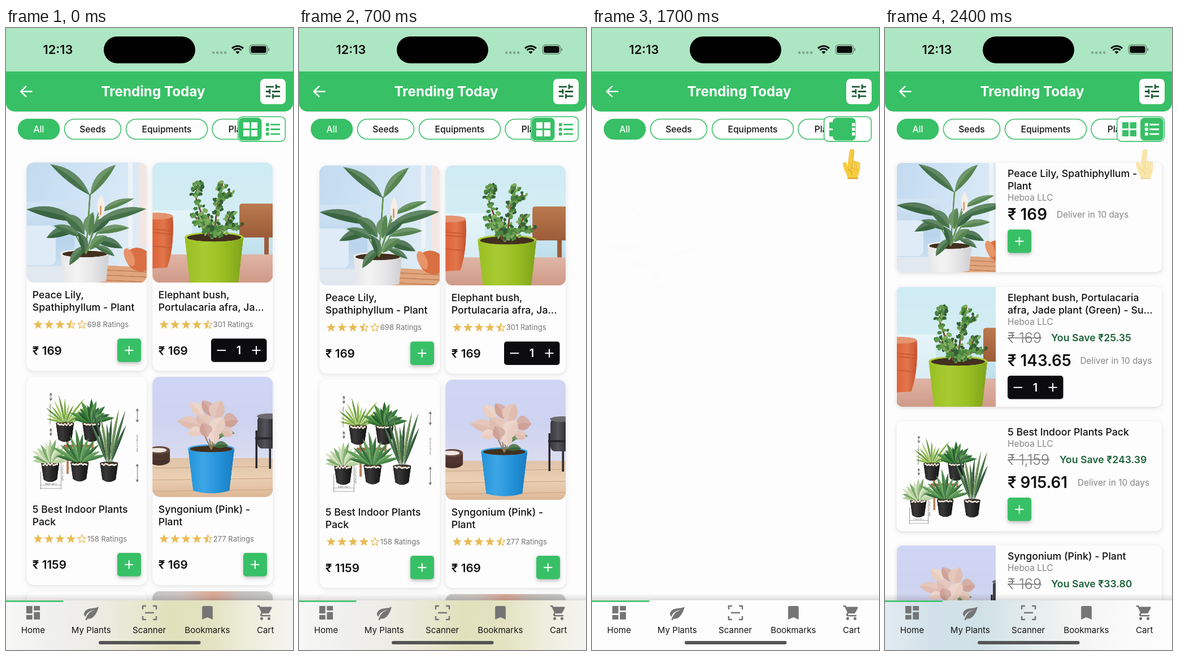
An HTML page with a canvas for the animation above (2500 ms loop, 508 by 1102 pixels).

```html
<!DOCTYPE html>
<html lang="en">
<head>
<meta charset="utf-8">
<title>Trending Today</title>
<style>
  html, body { margin: 0; width: 100%; height: 100%; overflow: hidden; background: #fefdfe; }
  canvas { display: block; width: 508px; height: 1102px; }
</style>
</head>
<body>
<canvas id="stage" aria-label="Plant shop: trending products"></canvas>
<script>
const W = 508, H = 1102, LOOP = 2500, STEP = 100, TAP = 1650;
const GREEN = '#38c066', PAPER = '#fefdfe', GREY = '#757575', GOLD = '#e8bb55';
const TAU = Math.PI * 2;
const stage = document.getElementById('stage');
const dpr = window.devicePixelRatio || 1;
stage.width = W * dpr;
stage.height = H * dpr;
let c = stage.getContext('2d');
c.scale(dpr, dpr);

// ---- helpers ----
const ease = x => x * x * (3 - 2 * x);
const clamp = x => Math.min(1, Math.max(0, x));

function track(t, keys) {
  if (t <= keys[0][0]) return keys[0][1];
  for (let i = 1; i < keys.length; i++) {
    const [t0, a] = keys[i - 1], [t1, b] = keys[i];
    if (t <= t1) return a + (b - a) * ease((t - t0) / (t1 - t0));
  }
  return keys[keys.length - 1][1];
}

function seeded(s) {
  return () => (s = (s * 16807) % 2147483647) / 2147483647;
}

function rect(x, y, w, h, fill) {
  c.fillStyle = fill;
  c.fillRect(x, y, w, h);
}

function box(x, y, w, h, r, fill, stroke, lw = 1.6) {
  c.beginPath();
  c.roundRect(x, y, w, h, r);
  if (fill) { c.fillStyle = fill; c.fill(); }
  if (stroke) { c.strokeStyle = stroke; c.lineWidth = lw; c.stroke(); }
}

function line(pts, color, lw, cap = 'butt') {
  c.beginPath();
  pts.forEach(([x, y], i) => i ? c.lineTo(x, y) : c.moveTo(x, y));
  c.strokeStyle = color;
  c.lineWidth = lw;
  c.lineCap = cap;
  c.lineJoin = 'round';
  c.stroke();
}

function poly(pts, fill) {
  c.beginPath();
  pts.forEach(([x, y], i) => i ? c.lineTo(x, y) : c.moveTo(x, y));
  c.fillStyle = fill;
  c.fill();
}

function oval(x, y, rx, ry, fill, turn = 0) {
  c.beginPath();
  c.ellipse(x, y, rx, ry, turn, 0, TAU);
  c.fillStyle = fill;
  c.fill();
}

function fade(x0, y0, x1, y1, ...stops) {
  const g = c.createLinearGradient(x0, y0, x1, y1);
  stops.forEach((s, i) => g.addColorStop(i / (stops.length - 1), s));
  return g;
}

function text(s, x, y, size, weight, color, align = 'left') {
  c.font = `${weight} ${size}px Inter, sans-serif`;
  c.textAlign = align;
  c.fillStyle = color;
  c.fillText(s, x, y);
}

function icon(d, cx, cy, k, color) {
  c.save();
  c.translate(cx - 12 * k, cy - 12 * k);
  c.scale(k, k);
  c.fillStyle = color;
  c.fill(new Path2D(d));
  c.restore();
}

function shadowed(blur, dy, alpha, fn) {
  c.save();
  c.shadowColor = `rgba(0,0,0,${alpha})`;
  c.shadowBlur = blur;
  c.shadowOffsetY = dy;
  fn();
  c.restore();
}

function sprite(w, h, fn) {
  const cv = document.createElement('canvas'), back = c;
  cv.width = w * 2;
  cv.height = h * 2;
  c = cv.getContext('2d');
  c.scale(2, 2);
  fn();
  c = back;
  return cv;
}

// ---- plants ----
// An arching blade, lighter on one side of its midrib.
function leaf(x, y, tx, ty, w, color, arch = .5) {
  const dx = tx - x, dy = ty - y, n = Math.hypot(dx, dy), bend = -Math.sign(dx) * arch * w;
  const ctrl = k => [x + dx * .5 - dy / n * k, y + dy * .5 + dx / n * k];
  const blade = (a, b, fill) => {
    c.beginPath();
    c.moveTo(x, y);
    c.quadraticCurveTo(...ctrl(bend + a), tx, ty);
    c.quadraticCurveTo(...ctrl(bend + b), x, y);
    c.fillStyle = fill;
    c.fill();
  };
  blade(w, -w, color);
  blade(0, -Math.sign(dx) * w, 'rgba(255,255,255,.15)');
}

function fan(x, y, n, spread, len, w, colors, rnd) {
  for (let i = 0; i < n; i++) {
    const u = i / (n - 1) - .5, a = u * spread - Math.PI / 2, l = len * (.6 + .4 * rnd());
    leaf(x + u * 8, y, x + Math.cos(a) * l, y + Math.sin(a) * l, w, colors[i % colors.length]);
  }
}

function pot(x, top, bottom, rTop, rBot, dark, mid, light) {
  const g = fade(x - rTop, 0, x + rTop, 0, mid, light, mid, dark), ry = rTop * .17;
  c.beginPath();
  c.moveTo(x - rTop, top);
  c.lineTo(x - rBot, bottom - 4);
  c.quadraticCurveTo(x, bottom + 5, x + rBot, bottom - 4);
  c.lineTo(x + rTop, top);
  c.fillStyle = g;
  c.fill();
  oval(x, top, rTop, ry, light);
  oval(x, top + 1, rTop * .92, ry * .8, '#42301f');
}

const lily = sprite(213, 213, () => {
  rect(0, 0, 213, 213, fade(0, 0, 213, 60, '#c3daf0', '#cfe4f5', '#dfecf5'));
  rect(0, 70, 85, 143, fade(0, 70, 0, 213, '#d3e5f4', '#b9d4ec', '#dce8f2'));
  box(-10, 112, 62, 70, 12, '#dfebf6');
  rect(180, 0, 8, 150, '#eef3f8');
  rect(199, 0, 14, 150, '#f3e6e2');
  rect(0, 184, 213, 29, '#e2e8f0');
  poly([[120, 181], [213, 186], [213, 213], [120, 213]], '#e0a57d');
  for (const y of [190, 199, 208]) line([[130, y], [213, y + 4]], '#b97850', 1.2);
  oval(199, 172, 24, 20, '#d97044', .5);
  oval(182, 168, 8, 17, '#e79468', -.4);
  pot(103, 161, 214, 43, 38, '#cfcfd2', '#e6e6e8', '#f5f4f4');
  for (const [x, y] of [[112, 58], [113, 55], [80, 95], [128, 95], [130, 80], [85, 125], [125, 125]])
    line([[105, 162], [x, y]], '#65924c', 2);
  const greens = ['#457249', '#568550', '#3a6541'];
  [[112, 58, 42, 3, 18], [113, 58, 158, 4, 17], [92, 105, 0, 83, 20], [122, 107, 212, 82, 17],
   [130, 88, 190, 64, 12], [94, 118, 35, 134, 18], [103, 128, 64, 92, 20], [122, 126, 182, 116, 14],
   [117, 126, 150, 98, 16], [108, 147, 76, 182, 15], [112, 130, 118, 88, 19], [118, 138, 170, 152, 17],
   [96, 132, 48, 112, 14], [112, 155, 142, 130, 16], [103, 160, 92, 124, 15], [120, 148, 156, 166, 11]
  ].forEach(([x, y, tx, ty, w], i) => leaf(x, y, tx, ty, w, greens[i % 3]));
  leaf(132, 100, 132, 56, 13, '#f5efe5');
  line([[131, 78], [131, 92]], '#df9b77', 3, 'round');
});

const bush = sprite(213, 213, () => {
  rect(0, 0, 213, 213, fade(0, 0, 0, 170, '#cfebf3', '#d3edf4', '#bedfec'));
  rect(0, 85, 70, 85, 'rgba(255,255,255,.4)');
  box(154, 73, 70, 60, 4, fade(0, 73, 0, 133, '#bb7a4e', '#9c5c39'));
  rect(198, 130, 8, 35, '#9c5c39');
  rect(0, 163, 213, 50, fade(0, 163, 0, 213, '#e0b5a6', '#d09a88'));
  c.beginPath();
  c.moveTo(-10, 96);
  c.lineTo(36, 96);
  c.quadraticCurveTo(39, 150, 26, 186);
  c.lineTo(-10, 188);
  c.fillStyle = fade(0, 0, 38, 0, '#e0633a', '#e2774c', '#c4502c');
  c.fill();
  oval(8, 95, 28, 6, '#e59370');
  for (const y of [118, 124, 148]) line([[0, y], [34, y + 3]], '#c4562f', 1.6);
  pot(109, 132, 216, 52, 43, '#7fa31b', '#99bf22', '#a9cb33');
  const rnd = seeded(77), greens = ['#4a8540', '#639c4c', '#335f34', '#7dae5c'];
  const stems = [[100, 130, 76, 60], [76, 60, 82, 34], [108, 132, 116, 70], [116, 70, 124, 36],
    [112, 120, 158, 112], [100, 120, 74, 95], [116, 72, 136, 52], [104, 125, 98, 92], [122, 128, 140, 88]];
  for (const [x, y, tx, ty] of stems) line([[x, y], [tx, ty]], '#7a4a37', 3, 'round');
  for (const [x, y, tx, ty] of stems)
    for (let i = 0; i < 26; i++) {
      const u = rnd();
      oval(x + (tx - x) * u + (rnd() - .5) * 17, y + (ty - y) * u + (rnd() - .5) * 10,
        2.8 + rnd() * 2.2, 2 + rnd() * 1.6, greens[Math.floor(rnd() * 4)], rnd() * 3);
    }
});

const pack = sprite(213, 213, () => {
  rect(0, 0, 213, 213, PAPER);
  const rnd = seeded(31), ink = '#555';
  line([[73, 105], [73, 172]], '#b9805a', 4);
  line([[66, 123], [118, 123]], '#a86c49', 5);
  line([[117, 105], [117, 130]], '#b9805a', 4);
  const kinds = [
    [68, 82, 13, 2.7, 56, 3.4, ['#7fae3e', '#a2c75b', '#5f9236']],
    [115, 82, 13, 2.7, 45, 8, ['#2f6f33', '#468b3d', '#245b2b']],
    [42, 153, 13, 2.9, 47, 7, ['#b4cf9b', '#78a767', '#d2e0bd']],
    [94, 152, 12, 2.6, 62, 6.5, ['#2f6a35', '#5a9a4e', '#40803f']],
    [146, 153, 8, .85, 102, 5, ['#3d6b40', '#2b5232', '#6b8a4f']]
  ];
  for (const [x, y, n, spread, len, w, colors] of kinds) {
    pot(x, y, y + 33, 16, 12, '#151515', '#252424', '#3a3838');
    fan(x, y, n, spread, len, w, colors, rnd);
    for (let i = 0; i < 9; i++) oval(x - 12 + i * 3, y + 1 + rnd() * 3, 2, 1.6, '#eee5db');
  }
  const ruler = (x, y0, y1) => {
    line([[x, y0], [x, y1]], ink, .8);
    for (const [y, d] of [[y0, 4], [y1, -4]]) line([[x - 2, y + d], [x, y], [x + 2, y + d]], ink, 1);
  };
  ruler(43, 29, 42);
  ruler(43, 92, 104);
  ruler(196, 57, 80);
  ruler(196, 155, 186);
  const note = (s, x, y) => {
    c.save();
    c.translate(x, y);
    c.rotate(Math.PI / 2);
    text(s, 0, 0, 3.6, 400, ink, 'center');
    c.restore();
  };
  note('Height 10 inch approx', 41, 66);
  note('20 inch to 24 inch', 195, 118);
  note('4 inch pot height', 63, 170);
  line([[25, 168], [25, 199]], ink, .6);
  line([[61, 152], [61, 199]], ink, .6);
  line([[25, 192], [61, 192]], ink, .6);
  line([[25, 198], [61, 198]], ink, .6);
  text('4 inch width', 43, 191, 3.6, 400, ink, 'center');
});

const syngonium = sprite(213, 213, () => {
  rect(0, 0, 213, 213, fade(0, 0, 0, 145, '#d0d6f5', '#cdd3f0', '#dadcf0'));
  rect(0, 144, 213, 69, fade(0, 144, 0, 213, '#e0c3a8', '#ebd0b4', '#ddb897'));
  for (const y of [162, 183, 203]) line([[0, y], [213, y - 3]], '#c9a283', 1);
  oval(12, 148, 19, 9, '#47302b');
  rect(-7, 130, 38, 18, '#50352f');
  oval(12, 130, 19, 7, '#684a40');
  oval(10, 130, 15, 4, '#eee5df');
  line([[184, 95], [184, 162]], '#29282d', 3.5);
  line([[208, 110], [208, 163]], '#29282d', 3.5);
  box(186, 69, 40, 58, 8, fade(186, 0, 213, 0, '#3a3a40', '#55545a', '#303036'));
  oval(207, 70, 22, 5, '#6c6a6e');
  rect(182, 107, 31, 4, '#29282d');
  pot(104, 127, 206, 41, 32, '#1a7cc0', '#2493da', '#3ea6e6');
  for (const x of [82, 96, 112, 126]) line([[104, 129], [x, 82]], '#8f7752', 2);
  leaf(104, 116, 138, 92, 15, '#4d7b45');
  leaf(108, 124, 134, 122, 12, '#3c6639');
  leaf(114, 105, 146, 100, 12, '#6f9460');
  const pinks = ['#e0bdb0', '#e9cdc0', '#cfa298'];
  [[90, 90, 44, 78, 22], [88, 72, 66, 45, 20], [104, 70, 88, 42, 20], [112, 78, 122, 42, 28],
   [90, 98, 62, 100, 18], [122, 82, 152, 78, 26], [104, 98, 78, 68, 28], [108, 106, 126, 72, 28],
   [96, 108, 88, 82, 22], [122, 96, 142, 104, 18], [110, 118, 112, 94, 20]
  ].forEach(([x, y, tx, ty, w], i) => leaf(x, y, tx, ty, w, pinks[i % 3], .25));
});

const nextPhoto = sprite(213, 213, () =>
  rect(0, 0, 213, 213, fade(0, 0, 213, 0, '#c6c6c6', '#cfc6c2', '#dba996', '#c4c2c0', '#c9c9c9')));
const blank = sprite(213, 213, () => rect(0, 0, 213, 213, PAPER));

const hand = sprite(44, 64, () => {
  const skin = '#f6cb3f', edge = '#d79a25';
  c.translate(-438, -210);
  poly([[453, 241], [473, 237], [474, 252], [470, 266], [453, 267], [450, 257]], skin);
  line([[447.5, 241], [449, 248], [454, 258]], skin, 7, 'round');
  line([[460, 219], [456.5, 246]], edge, 8.6, 'round');
  line([[459.6, 219], [456.2, 246]], skin, 7.6, 'round');
  [464, 468.3, 471.5].forEach((x, i) => {
    line([[x, 238 + i * 1.6], [x - .8, 247 + i]], edge, 6, 'round');
    line([[x, 238 + i * 1.6], [x - .8, 247 + i]], '#f9d452', 4.8, 'round');
  });
  line([[453, 251], [459, 254], [460, 259]], edge, 1.2, 'round');
  line([[453, 266.5], [470, 266.5]], edge, 2, 'round');
});

// ---- shop parts ----
function photo(img, x, y, w, size, r) {
  c.save();
  c.beginPath();
  c.roundRect(x, y, w, size, r);
  c.clip();
  c.drawImage(img, x, y, size, size);
  c.restore();
}

function starPath(x, y, r) {
  c.beginPath();
  for (let i = 0; i < 10; i++) {
    const a = i * Math.PI / 5 - Math.PI / 2, k = i % 2 ? r * .42 : r;
    c.lineTo(x + Math.cos(a) * k, y + Math.sin(a) * k);
  }
  c.closePath();
}

function stars(x, y, score) {
  for (let i = 0; i < 5; i++) {
    const part = clamp(score - i), sx = x + i * 19.4;
    c.save();
    c.fillStyle = c.strokeStyle = GOLD;
    c.lineWidth = 1.3;
    starPath(sx, y, part === 1 ? 8.8 : 7.8);
    if (part < 1) c.stroke();
    if (part === .5) {
      c.clip();
      c.fillRect(sx - 9, y - 9, 9, 18);
    } else if (part) c.fill();
    c.restore();
  }
}

function plus(x, y) {
  line([[x - 7.5, y], [x + 7.5, y]], '#fff', 2);
  line([[x, y - 7.5], [x, y + 7.5]], '#fff', 2);
}

function addButton(x, y) {
  shadowed(6, 3, .25, () => box(x, y, 42, 41.5, 5, GREEN));
  plus(x + 20.8, y + 20.8);
}

function stepper(x, y) {
  box(x, y, 98.5, 41.5, 5, '#0c0b0d');
  line([[x + 10.5, y + 20.8], [x + 26, y + 20.8]], '#fff', 2);
  text('1', x + 49, y + 28, 20, 600, '#fff', 'center');
  plus(x + 80, y + 20.8);
}

const grid = [
  { img: lily, lines: ['Peace Lily,', 'Spathiphyllum - Plant'], score: 3.5, votes: 698, price: 169 },
  { img: bush, lines: ['Elephant bush,', 'Portulacaria afra, Ja...'], score: 4.5, votes: 301, price: 169, inCart: true },
  { img: pack, lines: ['5 Best Indoor Plants', 'Pack'], score: 4, votes: 158, price: 1159 },
  { img: syngonium, lines: ['Syngonium (Pink) -', 'Plant'], score: 4.5, votes: 277, price: 169 },
  { img: blank },
  { img: nextPhoto }
];

function gridCard(p, x, y) {
  shadowed(7, 2, .11, () => box(x, y, 213, 369, 13, PAPER));
  photo(p.img, x, y, 213, 213, 13);
  if (!p.price) return;
  p.lines.forEach((s, i) => text(s, x + 10.5, y + 241 + i * 22, 17.7, 500, '#111'));
  stars(x + 20.5, y + 287.5, p.score);
  text(p.votes + ' Ratings', x + 107.5, y + 291.8, 13, 400, GREY);
  text('₹ ' + p.price, x + 10.5, y + 340.5, 20.7, 600, '#111');
  if (p.inCart) stepper(x + 103.7, y + 312);
  else addButton(x + 160.7, y + 312);
}

const list = [
  { img: lily, top: 238.5, h: 194, start: 1688, lines: ['Peace Lily, Spathiphyllum -', 'Plant'], price: '169', noteX: 304 },
  { img: bush, top: 458.5, h: 212.5, start: 1715, lines: ['Elephant bush, Portulacaria', 'afra, Jade plant (Green) - Su...'],
    was: '169', save: '25.35', saveX: 294, price: '143.65', noteX: 345.5, inCart: true },
  { img: pack, top: 696.5, h: 195, start: 1800, lines: ['5 Best Indoor Plants Pack'],
    was: '1,159', save: '243.39', saveX: 309, price: '915.61', noteX: 341 },
  { img: syngonium, top: 917, h: 195, start: 1885, lines: ['Syngonium (Pink) - Plant'],
    was: '169', save: '33.80', saveX: 294, price: '135.20', noteX: 345.5 }
];

function listCard(p, t) {
  const shown = ease(clamp((t - p.start) / 400)), x = 217;
  if (!shown) return;
  const top = p.top + 70 * (1 - shown);
  c.save();
  c.globalAlpha = shown;
  shadowed(7, 2, .13, () => box(20.5, top, 469.5, p.h, 10, PAPER));
  photo(p.img, 20.5, top, 175.5, p.h, [10, 0, 0, 10]);
  let y = top + 25;
  p.lines.forEach((s, i) => text(s, x, y + i * 22, 17.7, 500, '#111'));
  y += (p.lines.length - 1) * 22 + 20;
  text('Heboa LLC', x, y, 15.4, 400, '#858585');
  if (p.was) {
    y += 32;
    text('₹ ' + p.was, x, y, 25, 300, '#777');
    const w = c.measureText('₹ ' + p.was).width;
    line([[x, y - 8.5], [x + w, y - 8.5]], '#777', 1.5);
    text('You Save ₹' + p.save, p.saveX, y - 3, 17.7, 600, '#1c6339');
    y += 7;
  }
  y += 34;
  text('₹ ' + p.price, x, y, 27.8, 600, '#111');
  text('Deliver in 10 days', p.noteX, y - 4, 15.4, 400, '#858585');
  if (p.inCart) stepper(x, y + 17.5);
  else addButton(x, y + 17.5);
  c.restore();
}

// ---- chrome ----
const TUNE = 'M3 17v2h6v-2H3zM3 5v2h10V5H3zm10 16v-2h8v-2h-8v-2h-2v6h2zM7 9v2H3v2h4v2h2V9H7zm14 4v-2H11v2h10zm-6-4h2V7h4V5h-4V3h-2v6z';
const TILES = 'M3 3h8v8H3zm10 0h8v8h-8zM3 13h8v8H3zm10 0h8v8h-8z';
const ROWS = 'M3 4h4v4H3zm6 1h12v2H9zM3 10h4v4H3zm6 1h12v2H9zM3 16h4v4H3zm6 1h12v2H9z';
const HOME = 'M3 13h8V3H3zm0 8h8v-6H3zm10 0h8V11h-8zm0-18v6h8V3z';
const LEAF = 'M17 8C8 10 5.9 16.2 3.8 21.3l1.9.7 1-2.3c.4.2.9.3 1.3.3C19 20 22 3 22 3c-1 2-8 2.3-13 3.3S2 11.5 2 13.5s1.8 3.8 1.8 3.8C7 8 17 8 17 8z';
const MARK = 'M17 3H7c-1.1 0-2 .9-2 2v16l7-3 7 3V5c0-1.1-.9-2-2-2z';
const CART = 'M7 18a2 2 0 1 0 .01 0zM1 2v2h2l3.6 7.6-1.4 2.4c-.7 1.3.3 3 1.8 3h12v-2H7.4l-.2-.4.9-1.6h7.5c.7 0 1.4-.4 1.7-1l3.6-6.5c.4-.7-.1-1.5-.9-1.5H5.2l-.9-2zM17 18a2 2 0 1 0 .01 0z';

function statusBar() {
  rect(0, 0, W, 77, '#ade6c3');
  text('12:13', 65.5, 46, 21.8, 600, '#0c0c0c');
  box(173, 15, 162, 47.5, 23.7, '#000');
  for (let i = 0; i < 4; i++) box(365 + i * 7, 41.5, 4.2, 4.2, 1, '#7da68c');
  c.strokeStyle = c.fillStyle = '#0c0c0c';
  c.lineWidth = 3;
  c.lineCap = 'butt';
  for (const r of [5, 9.3, 14]) {
    const core = r === 5;
    c.beginPath();
    if (core) c.moveTo(410, 46);
    c.arc(410, 46, r, -Math.PI * .75, -Math.PI * .25);
    if (core) c.fill(); else c.stroke();
  }
  box(431.2, 30, 31.5, 16.4, 5, null, '#64886f', 1.3);
  box(433.3, 32.1, 27.3, 12.2, 3.2, '#0c0c0c');
  box(464.3, 35.5, 1.8, 5.5, 1, '#64886f');
}

function header() {
  box(0, 77, W, 71, [0, 0, 15, 15], GREEN);
  line([[46.5, 112.5], [26.5, 112.5]], '#fff', 2.5);
  line([[36, 102.8], [26.3, 112.5], [36, 122.2]], '#fff', 2.5);
  text('Trending Today', 260.5, 121, 24.2, 700, '#fff', 'center');
  box(450, 90, 45, 45, 8, '#fff');
  icon(TUNE, 472.5, 112.5, 1.4, '#1b5a35');
}

function chip(label, x, w, on) {
  box(x, 161.5, w, 35.5, 17.7, on ? GREEN : '#fff', GREEN);
  text(label, x + w / 2, 185, 15.6, 500, on ? '#fff' : '#111', 'center');
}

function filters(t) {
  const tapped = t >= TAP;
  chip('All', 21.5, 73, true);
  chip('Seeds', 103.5, 100, false);
  chip('Equipments', 212.5, 144, false);
  chip('Plants', 365, 103, false);
  box(410.7, 157.3, 83.6, 43.6, 8, '#fff', GREEN);
  box(track(t, [[1600, 412], [1850, 452]]), 159, 40.5, 40.3, 7, GREEN);
  icon(TILES, 432.5, 179.5, 1.39, tapped ? GREEN : '#fff');
  icon(ROWS, 472.5, 179.5, 1.39, tapped ? '#fff' : GREEN);
}

function tabBar(t) {
  rect(0, 1002, W, 12, fade(0, 1002, 0, 1014, 'rgba(0,0,0,0)', 'rgba(0,0,0,.13)'));
  rect(0, 1014, W, 88, '#fdfdfd');
  if (t < TAP) {
    rect(0, 1014, W, 88, fade(0, 0, W, 0, '#f7f7f6', '#f0f0ef', '#eeede8', '#e9e8d5', '#e0e1bb', '#e3e3c2', '#eeeede', '#f4f4f1'));
  } else {
    c.save();
    c.globalAlpha = ease(clamp((t - 1960) / 330));
    rect(0, 1014, W, 88, fade(0, 0, W, 0, '#e2ebf1', '#d2e1e9', '#d0e1e6', '#e4ecec', '#f5f4f4', '#fbfafa', '#fdfdfd'));
    c.restore();
  }
  rect(0, 1014.3, 101.5, 2.6, GREEN);
  icon(HOME, 48, 1036, 1.34, GREY);
  icon(LEAF, 151, 1036.4, 1.3, GREY);
  for (const sx of [-1, 1])
    for (const sy of [-1, 1])
      line([[254 + sx * 6, 1036 + sy * 12], [254 + sx * 12, 1036 + sy * 12], [254 + sx * 12, 1036 + sy * 6]], GREY, 2.5);
  line([[246, 1036], [262, 1036]], GREY, 2.5);
  icon(MARK, 356.5, 1036, 1.34, GREY);
  icon(CART, 459, 1036, 1.3, GREY);
  ['Home', 'My Plants', 'Scanner', 'Bookmarks', 'Cart'].forEach((s, i) =>
    text(s, 48 + i * 102.8, 1071.5, 15.1, 400, '#151515', 'center'));
  box(164, 1086, 180.5, 6, 3, '#555');
}

function draw(t) {
  rect(0, 0, W, H, PAPER);
  c.save();
  c.beginPath();
  c.rect(0, 205, W, H - 205);
  c.clip();
  if (t < TAP) {
    const top = track(t, [[0, 238.3], [250, 247.5], [700, 243.4]]);
    grid.forEach((p, i) => gridCard(p, 36.3 + (i % 2) * 223, top + Math.floor(i / 2) * 379.6));
  } else {
    list.forEach(p => listCard(p, t));
  }
  c.restore();
  statusBar();
  header();
  filters(t);
  tabBar(t);
  c.save();
  c.globalAlpha = track(t, [[1300, 0], [1400, .38], [1500, 1], [1800, 1], [2000, .45]]);
  c.drawImage(hand, 438, 210, 44, 64);
  c.restore();
}

const begin = performance.now();
function tick() {
  const ms = (performance.now() - begin) % LOOP;
  draw(Math.floor(ms / STEP) * STEP);
  requestAnimationFrame(tick);
}
tick();
</script>
</body>
</html>
```
